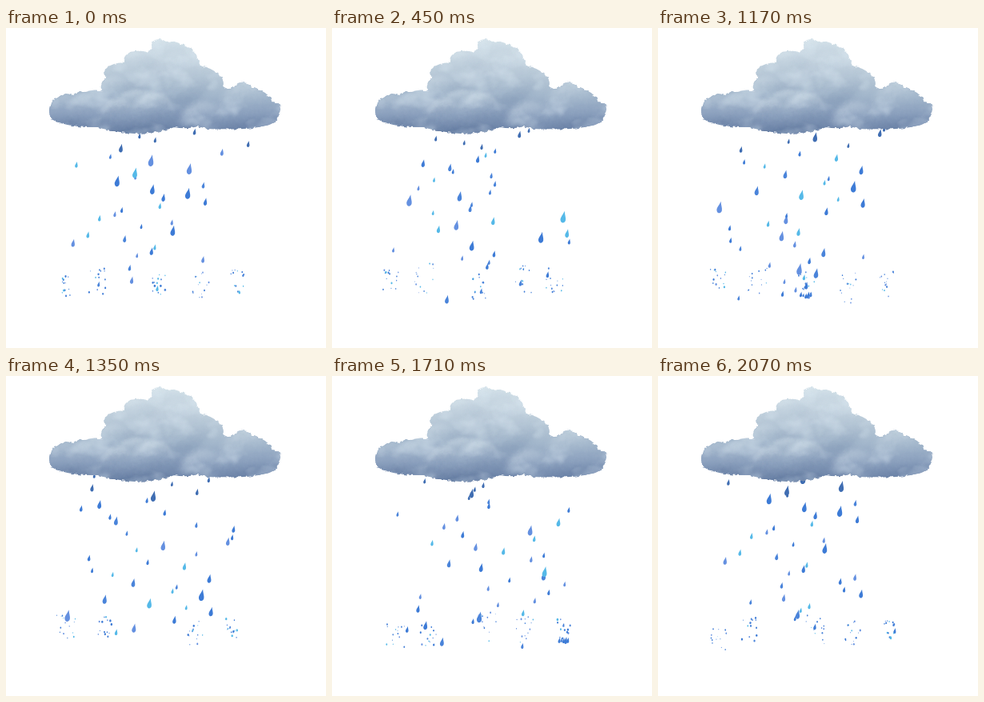
Animation, 400 px wide and 400 px high, one loop 2.16 s. Source, as an HTML page with a canvas:

```html
<!DOCTYPE html>
<html>
<head>
<meta charset="utf-8">
<style>
  html, body { margin: 0; width: 100%; height: 100%; overflow: hidden; background: #fff; }
  canvas, svg { position: absolute; left: 0; top: 0; }
  #cloud { filter: url(#rough); }
</style>
</head>
<body>
<canvas id="rain" width="400" height="400"></canvas>
<canvas id="cloud" width="400" height="400"></canvas>
<svg width="0" height="0">
  <filter id="rough" x="0" y="0" width="100%" height="100%" color-interpolation-filters="sRGB">
    <feTurbulence type="fractalNoise" baseFrequency=".2" numOctaves="2" seed="4" result="fine"/>
    <feDisplacementMap in="SourceGraphic" in2="fine" scale="4" xChannelSelector="R" yChannelSelector="G" result="edge"/>
    <feTurbulence type="fractalNoise" baseFrequency=".03 .04" numOctaves="3" seed="9"/>
    <feColorMatrix values="0 0 0 0 .9  0 0 0 0 .95  0 0 0 0 .98  1 0 0 0 -.47"/>
    <feComposite in2="edge" operator="in" result="wisps"/>
    <feMerge><feMergeNode in="edge"/><feMergeNode in="wisps"/></feMerge>
  </filter>
</svg>
<script>
const LOOP = 2160, STEP = 90, SPEED = 0.42, TOP = 114;
const BLUES = ['#3d7bd6', '#3d7bd6', '#4a84da', '#6490e0', '#55b9e8'];
const rain = document.getElementById('rain').getContext('2d');

let seed = 11;
const rand = (a = 0, b = 1) => {
  seed = (seed * 16807) % 2147483647;
  return a + (b - a) * seed / 2147483647;
};
const pick = list => list[Math.floor(rand(0, list.length))];
const many = (n, make) => Array.from({ length: n }, (_, i) => make(i));

// Starts are spread evenly over the loop so the rain stays equally dense
const DROPS = 176;
const drops = many(DROPS, i => ({
  start: i * LOOP / DROPS,
  x: rand() < .3 ? rand(150, 215) : rand(74, 306),
  size: 6.5 + 8.5 * rand() ** 2.2,
  end: rand(285, 345),
  color: pick(BLUES)
}));

// Five places on the ground, each splashing six times per loop
const splashes = [76, 119, 190, 242, 284].flatMap((x, place) => many(6, i => ({
  start: i * 360 + place * 150 + rand(-60, 60),
  x: x + rand(-6, 6),
  y: rand(312, 328),
  crown: rand() < .35,
  dots: many(14, () => ({
    dx: rand(-12, 12), dy: rand(-19, 18), r: rand(.5, 1.3), color: pick(BLUES)
  }))
})));

const age = (t, start) => ((t - start) % LOOP + LOOP) % LOOP;

function drawDrop(x, y, size, color) {
  rain.save();
  rain.translate(x, y);
  rain.rotate(.12);
  rain.scale(size * .85, size);
  rain.fillStyle = color;
  rain.beginPath();
  rain.moveTo(.05, -.5);
  rain.bezierCurveTo(.1, -.2, .28, .05, .26, .26);
  rain.bezierCurveTo(.2, .58, -.2, .58, -.26, .26);
  rain.bezierCurveTo(-.28, .05, -.05, -.2, .05, -.5);
  rain.fill();
  rain.restore();
}

function drawDot(x, y, r, color) {
  rain.fillStyle = color;
  rain.beginPath();
  rain.ellipse(x, y, r * .9, r * 1.2, 0, 0, 7);
  rain.fill();
}

function drawSplash(s, a) {
  const p = a / 360, spread = .55 + .5 * Math.sqrt(p);
  if (s.crown && p < .6)
    for (let i = -2; i <= 2; i++)
      drawDrop(s.x + i * (2.6 + p), s.y + 14 - Math.abs(i) * p * 2, 7 + i % 2 * 2, BLUES[0]);
  for (const d of s.dots)
    drawDot(s.x + d.dx * spread, s.y + d.dy * spread, d.r * (1.15 - .4 * p), d.color);
}

function draw(t) {
  rain.clearRect(0, 0, 400, 400);
  for (const d of drops) {
    const y = TOP + SPEED * age(t, d.start);
    if (y < d.end) drawDrop(d.x, y, d.size, y < 152 ? '#3f6db2' : d.color);
  }
  for (const s of splashes) {
    const a = age(t, s.start);
    if (a < 360) drawSplash(s, a);
  }
}

function drawCloud() {
  const c = document.getElementById('cloud').getContext('2d');
  const outline = new Path2D(`M55 103Q55 90 65 87Q74 79 83 84Q91 78 100 80Q112 75 121 80
    Q117 68 126 61Q121 52 130 47Q139 42 148 44Q147 33 156 30Q167 27 176 30Q186 26 183 17
    Q191 11 200 17Q210 15 218 20Q236 23 242 47Q255 49 266 58Q273 65 270 72Q278 79 284 74
    Q292 64 302 70Q308 76 318 78Q329 83 332 92Q342 92 342 101Q340 116 326 120Q297 126 270 124
    Q255 126 240 121Q226 125 210 122Q190 130 160 130Q135 128 115 122Q85 123 62 115Q55 111 55 103Z`);
  const base = c.createLinearGradient(0, 14, 0, 130);
  ['#d3e1e9', '#c6d5e0', '#b6c7d6', '#a2b6cb', '#8a9fbd', '#667ea4']
    .forEach((color, i) => base.addColorStop(i / 5, color));
  c.translate(0, 1);
  c.fillStyle = c.strokeStyle = base;
  c.lineWidth = 2;
  c.fill(outline);
  c.stroke(outline);
  c.clip(outline);

  // A round billow, lit from above and shaded below
  const billow = (x, y, r, light, shade) => {
    const g = c.createLinearGradient(x - r * .2, y - r, x + r * .2, y + r);
    g.addColorStop(0, `rgba(226,237,243,${light})`);
    g.addColorStop(.5, 'rgba(160,180,203,.08)');
    g.addColorStop(1, `rgba(84,108,148,${shade})`);
    c.fillStyle = g;
    c.beginPath();
    c.ellipse(x, y, r * 1.15, r, 0, 0, 7);
    c.fill();
  };
  c.filter = 'blur(3px)';
  billow(197, 38, 26, .4, .2);
  billow(218, 62, 32, .35, .25);
  billow(160, 54, 26, .4, .25);
  billow(195, 82, 34, .3, .25);
  billow(136, 82, 22, .45, .35);
  billow(104, 104, 24, .35, .5);
  billow(74, 103, 20, .3, .5);
  billow(298, 98, 28, .4, .3);
  billow(248, 120, 28, .4, .2);
  c.filter = 'blur(2px)';
  billow(186, 106, 25, .5, .35);
  billow(142, 110, 22, .5, .35);
  billow(164, 102, 26, .5, .3);
}

drawCloud();
const begin = performance.now();
function tick() {
  const t = (performance.now() - begin) % LOOP;
  draw(Math.floor(t / STEP) * STEP);
  requestAnimationFrame(tick);
}
tick();
</script>
</body>
</html>
```
